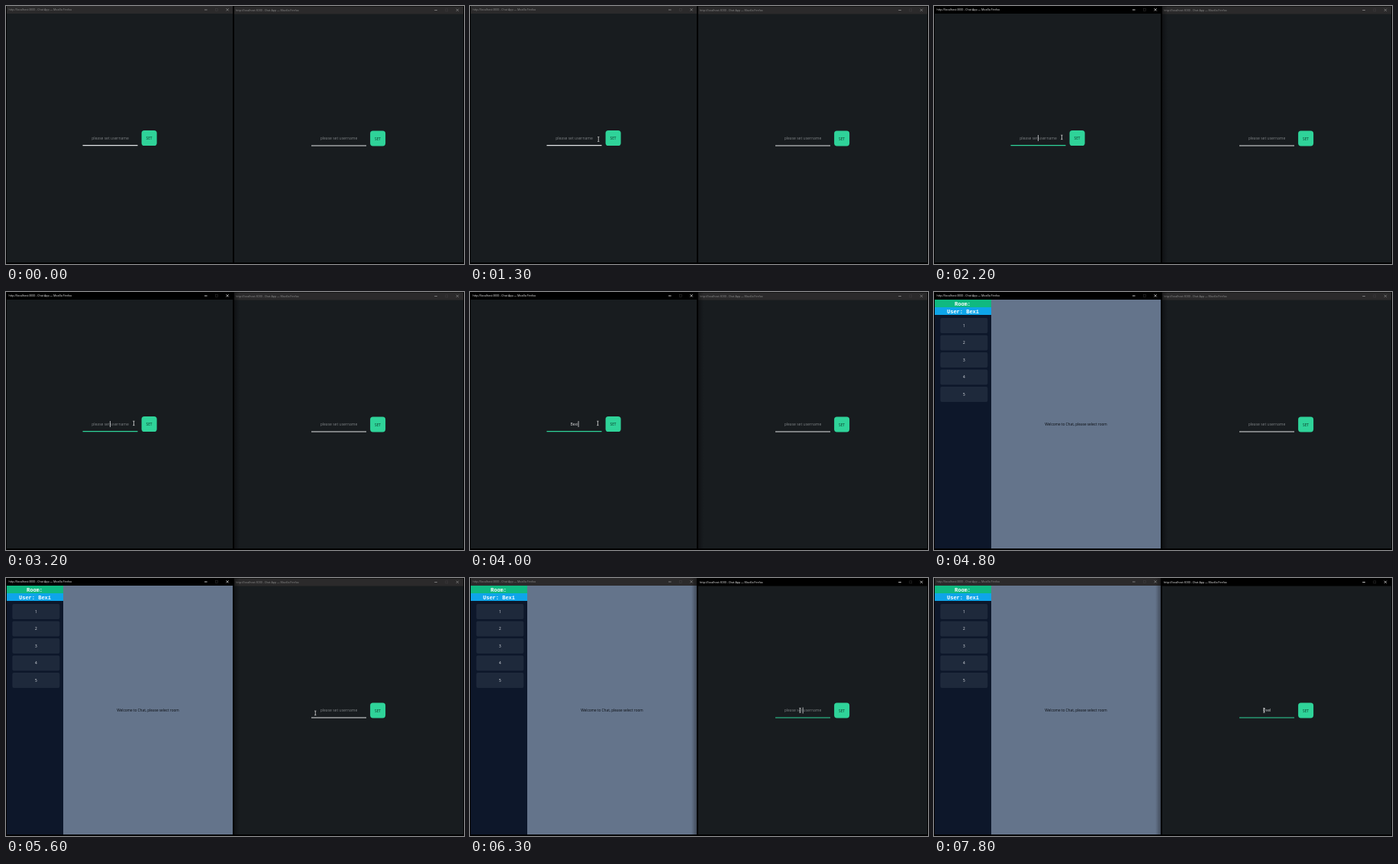
Recreate the animation shown at these times as an HTML page with a canvas. Size 600 px wide and 338 px high, loop 8 s.

```html
<!DOCTYPE html>
<html lang="en">
<head>
<meta charset="utf-8">
<title>Chat App</title>
<style>
  html, body { margin: 0; width: 100%; height: 100%; overflow: hidden; background: #000; }
  canvas { display: block; }
</style>
</head>
<body>
<canvas id="stage" width="600" height="338"></canvas>
<script>
const ctx = document.getElementById('stage').getContext('2d');
const LOOP = 8000;
const SANS = '"Open Sans", sans-serif';
const MONO = '"Liberation Mono", monospace';
const GREEN = [47, 211, 153], WHITE = [226, 228, 230];

const LEFT_CLICK = 1400, JOIN = 4800, RIGHT_CLICK = 5800;
const users = [
  { name: 'Bexi', focus: LEFT_CLICK, typing: 3300,
    caret: [[1400, 1800], [2200, 2500], [2800, 3800], [4000, 4200]] },
  { name: 'Ovel', focus: RIGHT_CLICK, typing: 7300,
    caret: [[5800, 6000], [6300, 6700], [7100, 7800]] }
];

// Pointer stops: time, x, y, shape used from that time on
const pointerPath = [
  [600, 178.5, 193, 'arrow'], [1000, 178.5, 193, 'arrow'],
  [1200, 170, 180, 'beam'], [1350, 167.3, 172, 'beam'],
  [4200, 167.3, 172, 'beam'], [4400, 177, 172, 'hand'],
  [4600, 184.5, 171, 'hand'], [4800, 186, 173, 'none'],
  [5300, 186, 173, 'arrow'], [5600, 405, 177, 'beam'],
  [5750, 432.3, 173.3, 'beam'], [LOOP, 432.3, 173.3, 'beam']
];

const clamp = v => Math.max(0, Math.min(1, v));
const mix = (a, b, k) => `rgb(${a.map((v, i) => v + (b[i] - v) * k)})`;

function rect(x, y, w, h, color, radius = 0) {
  ctx.fillStyle = color;
  ctx.beginPath();
  ctx.roundRect(x, y, w, h, radius);
  ctx.fill();
}

function text(str, x, y, size, color, align = 'center', family = SANS, weight = 400) {
  ctx.font = `${weight} ${size}px ${family}`;
  ctx.textAlign = align;
  ctx.textBaseline = 'alphabetic';
  ctx.fillStyle = color;
  ctx.fillText(str, x, y);
}

function line(points, color, width) {
  ctx.strokeStyle = color;
  ctx.lineWidth = width;
  ctx.beginPath();
  points.forEach(([x, y]) => ctx.lineTo(x, y));
  ctx.stroke();
}

function titleBar(x, y, w, h, active) {
  const color = active ? '#f2f2f2' : '#8d8d8d';
  rect(x, y, w, h, active ? '#000' : '#2b2a2b');
  ctx.save();
  ctx.translate(x < 100 ? 0 : 301, x < 100 ? 0 : 0.5);
  text('http://localhost:3000 - Chat App — Mozilla Firefox', x < 100 ? 3.5 : 0, 6.2, 3.6, color, 'left');
  if (x > 100) ctx.translate(0.3, 0);
  line([[260, 5], [263.6, 5]], color, 0.8);
  ctx.strokeStyle = active ? '#2c2c2c' : '#3c3b3c';
  ctx.lineWidth = 0.6;
  ctx.strokeRect(274.5, 3.4, 3, 3);
  line([[288.5, 3.2], [291.7, 6.4]], color, 0.7);
  line([[291.7, 3.2], [288.5, 6.4]], color, 0.7);
  ctx.restore();
}

function loginForm(dx, dy, user, t) {
  const count = Math.floor((t - user.typing) / 100) + 1;
  const typed = user.name.slice(0, Math.max(0, count));
  ctx.save();
  ctx.translate(dx, dy);
  text(typed || 'please set username', 136.5, 175, 5.05, typed ? '#d2d4d6' : '#7c8083');
  if (user.caret.some(([on, off]) => t >= on && t < off)) {
    const end = typed ? ctx.measureText(typed).width / 2 + 0.5 : 0;
    rect(136.2 + end, 169, 0.8, 8, '#d2d4d6');
  }
  rect(100.5, 182, 72, 1.2, mix(WHITE, GREEN, clamp((t - user.focus) / 200)));
  rect(177.6, 163, 20, 20, mix(GREEN, GREEN, 0), 3.6);
  text('SET', 187.5, 175.2, 4.75, '#0b3325');
  ctx.restore();
}

function chatRoom(name) {
  rect(1, 10, 74, 326, '#0d172a');
  rect(75, 10, 222, 326, '#64748b');
  rect(1, 10, 74, 10, '#10b981');
  rect(1, 20, 74, 10, '#0ea5e9');
  text('Room:', 37.5, 17.6, 7, '#fff', 'center', MONO, 700);
  text('User: ' + name, 38, 27.6, 7, '#fff', 'center', MONO, 700);
  for (let i = 0; i < 5; i++) {
    const y = 34 + i * 22.5;
    rect(8.3, y, 62, 20, '#1e293b', 2);
    text(i + 1, 39.3, y + 11.8, 4.7, '#e8ebef');
  }
  text('Welcome to Chat, please select room', 186, 175.2, 4.76, '#0a0d12');
}

function shadow(x, from, to) {
  const fade = ctx.createLinearGradient(x, 0, x + 7, 0);
  fade.addColorStop(0, `rgba(0,0,0,${from})`);
  fade.addColorStop(1, `rgba(0,0,0,${to})`);
  rect(x, 0, 7, 336, fade);
}

const shapes = {
  none() {},
  arrow() {
    const p = new Path2D('M0 0V6.4L1.5 5.1L2.5 7.2L3.5 6.8L2.6 4.7H4.6Z');
    ctx.fillStyle = '#fff';
    ctx.fill(p);
    ctx.strokeStyle = '#000';
    ctx.lineWidth = 0.35;
    ctx.stroke(p);
  },
  beam() {
    rect(-0.35, -3, 0.8, 6, '#d8d8d8');
    rect(-1.2, -3.2, 2.5, 0.6, '#d8d8d8');
    rect(-1.2, 2.5, 2.5, 0.6, '#d8d8d8');
  },
  hand() {
    const p = new Path2D('M-.6 .4Q0-.5 .6 .4V2.4L3 3Q3.5 3.3 3.4 4L2.8 6.6H-.7L-2.2 4.2Q-2.4 3.2-1.5 3.4L-.6 4Z');
    ctx.fillStyle = '#fff';
    ctx.fill(p);
    ctx.strokeStyle = '#111';
    ctx.lineWidth = 0.4;
    ctx.stroke(p);
  }
};

function pointer(t) {
  const next = pointerPath.findIndex(stop => stop[0] > t);
  if (next < 1) return;
  const [t0, x0, y0, shape] = pointerPath[next - 1];
  const [t1, x1, y1] = pointerPath[next];
  const k = (t - t0) / (t1 - t0);
  ctx.save();
  ctx.translate(x0 + (x1 - x0) * k, y0 + (y1 - y0) * k);
  shapes[shape]();
  ctx.restore();
}

function draw(t) {
  const leftActive = t >= LEFT_CLICK && t < RIGHT_CLICK;
  const rightActive = t >= RIGHT_CLICK;
  rect(0, 0, 600, 338, '#000');

  rect(1, 10, 296, 326, '#181c1f');
  if (t < JOIN) loginForm(0, 0, users[0], t);
  else chatRoom(users[0].name);
  titleBar(1, 0, 296, 10, leftActive);

  rect(299, 10, 300, 326, '#181c1f');
  loginForm(299.5, 0.4, users[1], t);
  titleBar(299, 0.5, 300, 10, rightActive);

  if (leftActive) shadow(299, 0.35, 0);
  if (rightActive) shadow(290, 0, 0.35);
  pointer(t);
}

function tick() {
  draw(performance.now() % LOOP);
  requestAnimationFrame(tick);
}
tick();
</script>
</body>
</html>
```
